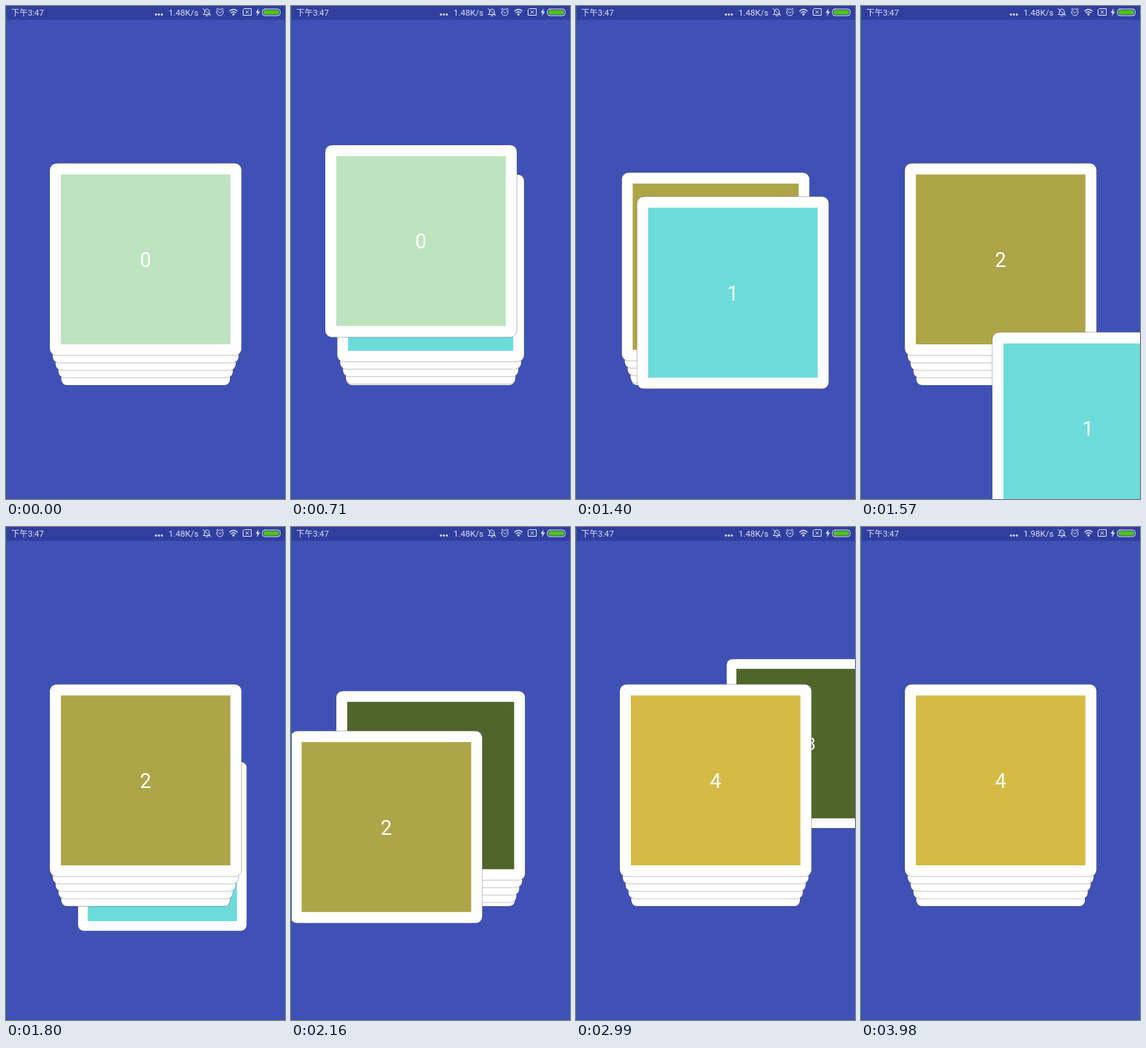
Write an HTML page with a canvas that moves like this. It is 376 px wide and 663 px high and loops after 4.23 s.

```html
<!DOCTYPE html>
<html lang="zh">
<head>
<meta charset="utf-8">
<title>Card stack</title>
<style>
html, body { margin: 0; width: 100%; height: 100%; overflow: hidden; background: #3f51b5; }
canvas { display: block; }
</style>
</head>
<body>
<canvas id="stage" width="376" height="663"></canvas>
<script>
const ctx = document.getElementById('stage').getContext('2d');
const LOOP = 4230, RETURN_MS = 250, SPEED_CHANGE = 3540;
const CX = 188.2, CY = 340.75, SIZE = 258.5, INSET = 15;
const LAST = 4, SHRINK = 0.03, DROP = 13.87, FULL_DRAG = 174;
const COLORS = ['#bde4bf', '#6ddbda', '#aea549', '#50652a', '#d5bb46'];

// Each swipe: screen refresh times, drag start, release time, release offset.
const swipes = [
  { steps: [710, 790, 870, 960, 1040, 1120, 1210], from: 690, release: 937, dx: -102, dy: -194 },
  { steps: [1400, 1490, 1570, 1630, 1720, 1800, 1890], from: 1370, release: 1620, dx: 124, dy: 239 },
  { steps: [2160, 2250, 2330, 2420, 2510], from: 2135, release: 2258, dx: -190, dy: 200 },
  { steps: [2750, 2830, 2910, 2990, 3080, 3170], from: 2725, release: 2921, dx: 156, dy: -72 }
];

const levelScale = level => 1 - SHRINK * level;

function card(x, y, scale, index) {
  ctx.save();
  ctx.translate(CX + x, CY + y);
  ctx.scale(scale, scale);
  ctx.beginPath();
  ctx.roundRect(-SIZE / 2, -SIZE / 2, SIZE, SIZE, 9);
  ctx.fillStyle = '#fff';
  ctx.fill();
  ctx.strokeStyle = 'rgba(0,0,0,.28)';
  ctx.lineWidth = 0.9;
  ctx.stroke();
  if (index !== undefined) {
    const side = SIZE - 2 * INSET;
    ctx.fillStyle = COLORS[index];
    ctx.fillRect(-side / 2, -side / 2, side, side);
    ctx.fillStyle = '#fff';
    ctx.font = '27px Roboto, sans-serif';
    ctx.textAlign = 'center';
    ctx.fillText(index, -0.2, 10.3);
  }
  ctx.restore();
}

const levelCard = (level, index) => card(0, DROP * level, levelScale(level), index);

// Cards at levels first..LAST, moved forward by shift; the top one shows its face.
function stack(first, shift, index) {
  levelCard(LAST);
  for (let i = LAST; i > first; i--) levelCard(i - shift);
  levelCard(first - shift, index);
}

function cards(t) {
  const count = swipes.filter(s => s.steps[0] <= t).length;
  const swipe = swipes[count - 1];
  if (!swipe) return stack(0, 0, 0);
  const now = swipe.steps.filter(s => s <= t).pop();
  if (now === swipe.steps.at(-1)) return stack(0, 0, count);

  const { from, release, dx, dy } = swipe;
  if (now < release) {
    const k = Math.sin((now - from) / (release - from) * Math.PI / 2);
    const shift = Math.min(1, Math.hypot(dx, dy) * k / FULL_DRAG);
    stack(1, shift, count);
    card(dx * k, dy * k, 1, count - 1);
  } else {
    const u = Math.min(1, (now - release) / RETURN_MS);
    const k = (1 - Math.cos(u * Math.PI)) / 2;
    card(dx * (1 - k), dy + (DROP * LAST - dy) * k, levelScale(LAST), count - 1);
    stack(0, 0, count);
  }
}

const line = (d, width = 1) => {
  ctx.lineWidth = width;
  ctx.stroke(new Path2D(d));
};

function dot(x, y, r) {
  ctx.beginPath();
  ctx.arc(x, y, r, 0, 7);
  ctx.fill();
}

function statusBar(t) {
  ctx.fillStyle = '#303f9f';
  ctx.fillRect(0, 0, 376, 18.5);
  ctx.fillStyle = ctx.strokeStyle = '#dde0f2';
  ctx.lineCap = ctx.lineJoin = 'round';
  ctx.textAlign = 'left';
  ctx.font = '11.2px Roboto, "Noto Sans CJK SC", "Noto Sans CJK", sans-serif';
  ctx.fillText('下午3:47', 7, 13);
  ctx.font = '11.5px Roboto, sans-serif';
  ctx.fillText(t < SPEED_CHANGE ? '1.48K/s' : '1.98K/s', 219, 13);
  for (const x of [202, 206, 210]) dot(x, 11.5, 1.4);

  // muted bell
  line('M266 11.5H275L274 9.5V7Q273.5 4 270.5 4Q268 4 267.5 7V9.5ZM269.5 13.2H272M265.5 3.5L276 13');
  // alarm clock
  line('M283.8 8.5a4.4 4.4 0 1 0 8.8 0a4.4 4.4 0 1 0 -8.8 0M286 7.5L288.2 9.5L290.5 7.5M283.5 4.5L285.5 3M293 4.5L291 3');
  // wifi
  line('M301.5 6.8Q306.5 2.3 311.5 6.8M303.5 9Q306.5 6.3 309.5 9', 1.4);
  dot(306.5, 11.2, 1.5);
  // empty SIM slot
  line('M321.5 3.5H330.5V12.5H319.5V5.5ZM323 6.2L327 10.2M327 6.2L323 10.2');
  // charging bolt and battery
  ctx.fill(new Path2D('M340.5 3L336.5 9H339L338 14L342.3 7.5H339.8Z'));
  ctx.beginPath();
  ctx.roundRect(345.5, 4, 24, 9, 3.5);
  ctx.lineWidth = 1;
  ctx.stroke();
  ctx.beginPath();
  ctx.roundRect(347, 5.4, 21, 6.2, 2.3);
  ctx.fillStyle = '#4fc415';
  ctx.fill();
}

function draw(t) {
  ctx.fillStyle = '#3f51b5';
  ctx.fillRect(0, 0, 376, 663);
  cards(t);
  statusBar(t);
  ctx.fillStyle = '#32607f';
  ctx.fillRect(0, 0, 1, 663);
}

const start = performance.now();
function tick() {
  draw((performance.now() - start) % LOOP);
  requestAnimationFrame(tick);
}
tick();
</script>
</body>
</html>
```
